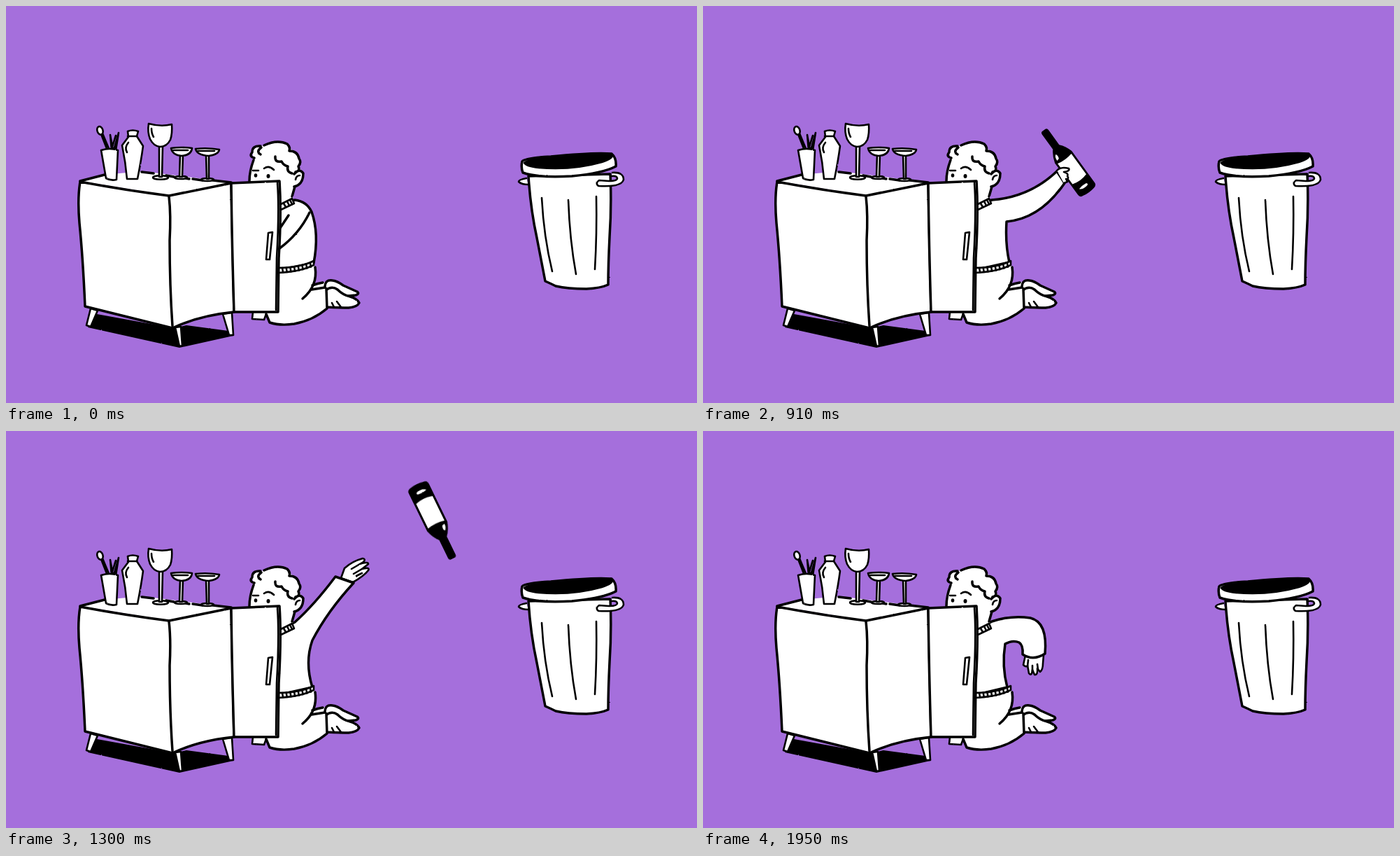
Recreate the animation shown at these times as an HTML page. Size 988 by 567 pixels, loop 2080 ms.

```html
<!DOCTYPE html>
<html lang="en">
<head>
<meta charset="utf-8">
<title>Clearing the cabinet</title>
<style>
html, body { margin: 0; width: 100%; height: 100%; overflow: hidden; background: #a56fdc; }
svg { display: block; width: 100vw; height: 100vh; }
.ink { fill: #fff; stroke: #000; stroke-width: 3.5; stroke-linecap: round; stroke-linejoin: round; }
.line { fill: none; }
.thin { stroke-width: 2.6; }
.solid { fill: #000; }
.arm { display: none; }
</style>
</head>
<body>
<svg viewBox="0 0 988 567">
  <defs>
    <filter id="rough" filterUnits="userSpaceOnUse" x="0" y="0" width="988" height="567" color-interpolation-filters="sRGB">
      <feTurbulence type="fractalNoise" baseFrequency=".2" numOctaves="2" seed="4"/>
      <feDisplacementMap in="SourceGraphic" scale="1.5" xChannelSelector="R" yChannelSelector="G"/>
    </filter>
    <clipPath id="outside"><path d="M0 0H988V214H868Q812 236 741 227V300H0Z"/></clipPath>
  </defs>
  <rect width="988" height="567" fill="#a56fdc"/>
  <g class="ink" filter="url(#rough)">

    <g id="can">
      <path class="thin" d="M744 246Q733 248 733 251Q737 255 747 255"/>
      <path d="M747 243Q750 290 759 331L771 393Q778 396 786 400Q803 404 830 404Q850 403 861 398Q861 370 863 330Q866 285 864 240Z"/>
      <path class="line thin" d="M766 274Q769 330 781 379M804 277Q806 334 815 383M844 272Q845 325 842 376"/>
      <path class="thin" d="M867 238Q883 237 883 248Q880 259 847 257Q842 253 848 249L862 250Q874 250 874 246Q873 242 866 243"/>
      <path d="M738 222Q742 217 779 215Q840 209 866 211Q873 217 872 229Q853 239 809 243Q762 246 739 238Q736 230 738 222Z"/>
      <path class="solid thin" d="M741 224Q745 219 780 216Q840 210 866 212Q870 217 852 223Q810 235 762 231Q744 229 741 224Z"/>
    </g>

    <g id="legs">
      <path class="thin" d="M353 437L352 447L369 448L373 437"/>
      <path stroke="none" d="M436 400L456 394L460 404L436 406Z"/>
      <path d="M456 402Q456 390 467 392Q474 393 482 399L502 408Q506 411 500 413L470 416Z"/>
      <path d="M457 406Q466 399 474 405Q482 413 492 415Q502 418 505 424Q502 430 490 431Q479 431 458 430Z"/>
      <path class="line thin" d="M473 422L479 430M466 424L469 430"/>
      <path stroke="none" d="M386 376L441 370Q445 388 437 405L457 403L459 432Q440 449 410 455Q390 457 377 452L372 440Z"/>
      <path class="line" d="M372 440L377 452Q392 457 412 454Q439 449 459 432L458 404M442 373Q446 400 424 418M438 399Q446 396 453 395M437 405L456 402"/>
    </g>

    <g class="arm" id="reach">
      <path d="M385 287L413 277Q430 279 437 294Q448 325 440 367L385 378Z"/>
      <path class="line" d="M434 295Q419 326 390 347M404 299L390 320"/>
    </g>
    <g class="arm" id="dig">
      <path d="M385 288L413 280Q425 277 434 289Q448 315 440 367L385 378Z"/>
      <path class="line" d="M437 301Q426 339 392 357M410 291Q405 309 391 323"/>
    </g>
    <g class="arm" id="lift">
      <path d="M385 288L413 277Q467 273 506 236L517 253Q482 304 434 308Q432 340 438 366L385 378Z"/>
    </g>
    <g class="arm" id="fling">
      <path class="thin" d="M479 210L484 196Q495 186 510 182Q515 183 511 187L506 190Q518 186 518 190L509 197Q521 194 518 199Q512 207 496 216Z"/>
      <path class="line thin" d="M506 190L494 197M509 197L497 204M509 203L501 207"/>
      <path d="M385 288L413 273Q441 248 471 208L497 217Q460 257 438 299Q427 330 438 366L385 378Z"/>
    </g>
    <g class="arm" id="drop">
      <path class="thin" d="M461 320L458 334Q462 338 464 335L466 346Q470 351 471 341L474 348Q479 349 478 339L482 344Q486 341 486 332L487 320Z"/>
      <path class="line thin" d="M465 327L464 336M471 335L471 343M478 333L479 341"/>
      <path d="M385 288L413 272Q440 263 468 267Q493 273 489 318Q472 329 457 319Q458 306 452 302Q443 298 432 304Q427 336 435 366L385 378Z"/>
    </g>

    <g id="belt">
      <path class="thin" d="M388 374Q420 374 440 364L440 370Q420 380 388 381Z"/>
      <path class="line thin" id="ribs"/>
    </g>

    <g id="head">
      <path stroke="none" d="M349 252L350 234L354 216Q350 208 356 201L370 199Q385 190 403 198Q407 206 415 209Q423 218 418 229L424 237Q424 254 413 259L409 280L390 288Z"/>
      <path class="line" d="M348 250Q348 236 354 220M355 217Q347 215 352 209Q352 199 364 200M369 199Q388 190 402 197Q407 202 405 207Q417 207 419 218Q423 223 418 229Q421 236 414 237M365 202Q357 208 364 212M385 215Q384 224 394 222Q397 228 403 229Q401 237 409 239"/>
      <path d="M412 240Q420 231 425 239Q425 255 412 258"/>
      <path class="line thin" d="M414 248Q415 242 420 242M369 232Q376 227 383 234M353 235L361 235"/>
      <ellipse class="solid" stroke="none" cx="357" cy="242" rx="2.3" ry="2.7"/>
      <ellipse class="solid" stroke="none" cx="375" cy="243" rx="2.5" ry="2.9"/>
      <path class="line" d="M413 258L409 272"/>
      <path class="thin" d="M391 284L409 275L412 282L393 291"/>
      <path class="line thin" d="M397 282L400 287M402 279L405 285M406 277L409 283"/>
    </g>

    <g id="cabinet">
      <path class="solid" stroke="none" d="M130 440L240 460L258 456L318 464L325 471L248 488L117 459Z"/>
      <g class="thin">
        <path d="M121 432L115 456L121 458L131 435Z"/>
        <path d="M242 459L248 486L252 485L250 458Z"/>
        <path d="M310 440L319 470L325 470L323 438Z"/>
      </g>
      <path stroke="none" d="M106 250L140 241L195 236L322 252L234 271Z"/>
      <path class="line" d="M106 250L141 241M194 237L211 239M229 242L240 244M257 246L262 247M267 247L281 249M296 249L322 252"/>
      <path d="M106 251Q170 263 233 271L322 253L326 437Q276 442 238 460L113 429Q110 360 105 310Q102 275 106 251Z"/>
      <path class="line" d="M233 272Q236 298 234 335Q234 400 238 457"/>
      <path d="M322 253L391 250Q394 295 390 360L389 437L326 437Q323 340 322 253Z"/>
      <path class="line thin" d="M388 253Q391 290 387 360L386 434"/>
      <path class="thin" d="M375 324L381 323L377 362L372 362Z"/>
    </g>

    <g id="things" class="thin">
      <path d="M136 183L145 206L148 206L138 182ZM149 184L151 206L153 206ZM161 181L154 206L157 206ZM157 185L151 204"/>
      <ellipse cx="134.5" cy="178" rx="4" ry="6" transform="rotate(-18 134 178)"/>
      <path d="M136 206Q148 202 160 206L158 248Q150 250 143 246Z"/>
      <path d="M174 179Q181 176 189 179L187 186L196 200Q193 222 188 247L173 247Q171 223 166 199L175 187Z"/>
      <path class="line" d="M174 186L187 186M175 195Q169 202 173 209"/>
      <ellipse cx="221" cy="245" rx="11" ry="2.8"/>
      <path d="M219 200L219 244L223 244L224 200Z"/>
      <path d="M204 168Q222 173 237 169Q238 182 235 191Q230 201 220 201Q211 200 206 190Q202 180 204 168Z"/>
      <path class="line" d="M208 175Q208 182 211 187"/>
      <ellipse cx="250" cy="245" rx="9" ry="2"/>
      <path d="M249 212L248 244L252 244L253 212Z"/>
      <path d="M236 203Q251 201 266 203Q265 213 251 214Q238 213 236 203Z"/>
      <path class="line" d="M239 206L260 206"/>
      <ellipse cx="288" cy="248" rx="9" ry="2"/>
      <path d="M286 212L287 247L290 247L290 212Z"/>
      <path d="M271 204Q288 202 305 205Q304 212 290 214Q273 213 271 204Z"/>
      <path class="line" d="M274 207L298 207"/>
    </g>

    <g clip-path="url(#outside)">
      <g id="bottle" stroke="none">
        <path class="solid" d="M-53 -16Q-59 -16 -59 -10Q-61 0 -59 10Q-58 16 -53 16L7 16Q18 13 26 6L54 6Q58 6 58 3L58 -3Q58 -6 54 -6L26 -6Q18 -13 7 -16Z"/>
        <path d="M-35 -13Q-39 0 -35 13L4 13Q1 0 4 -13Z"/>
        <path d="M-47 -9Q-45 -3 -46 5Q-49 8 -50 3Q-51 -6 -47 -9Z"/>
        <path d="M8 -11Q15 -11 17 -7Q14 -5 9 -7Z"/>
      </g>
    </g>
    <path class="thin" id="grip" d="M506 235Q511 229 523 232Q525 236 516 237Q523 239 521 243Q524 247 519 247L521 251L516 253"/>
  </g>
</svg>
<script>
const STEP = 130, COUNT = 16;
const $ = id => document.getElementById(id);
const arms = ["reach", "dig", "lift", "fling", "drop"];

// first step of each arm pose
const poses = [[0, "reach"], [1, "dig"], [3, "reach"], [5, "dig"], [7, "lift"], [9, "fling"], [14, "drop"]];

// bottle by step: x, y, angle, scale
const flight = {
  7: [519, 221, -126, .93],
  8: [519, 221, -126, .93],
  9: [565, 166, -208, .97],
  10: [613.5, 130, -296, 1],
  11: [673, 118, -351, 1],
  12: [731, 139.5, -406.5, 1],
  13: [789, 190, -458, 1]
};

let ribs = "";
for (let i = 0; i < 8; i++) {
  const x = 395 + i * 5.7, y = 374 - i * i * .15;
  ribs += `M${x} ${y}l1 6`;
}
$("ribs").setAttribute("d", ribs);

const show = (id, on) => { $(id).style.display = on ? "inline" : "none"; };

let last = -1;
function draw(now) {
  const step = Math.floor(now / STEP) % COUNT;
  if (step !== last) {
    last = step;
    const pose = poses.filter(p => p[0] <= step).pop()[1];
    arms.forEach(id => show(id, id === pose));
    show("grip", pose === "lift");
    const b = flight[step];
    show("bottle", !!b);
    if (b) $("bottle").setAttribute("transform", `translate(${b[0]} ${b[1]}) rotate(${b[2]}) scale(${b[3]})`);
  }
  requestAnimationFrame(t => draw(Math.max(0, t - start)));
}
const start = performance.now();
draw(0);
</script>
</body>
</html>
```
